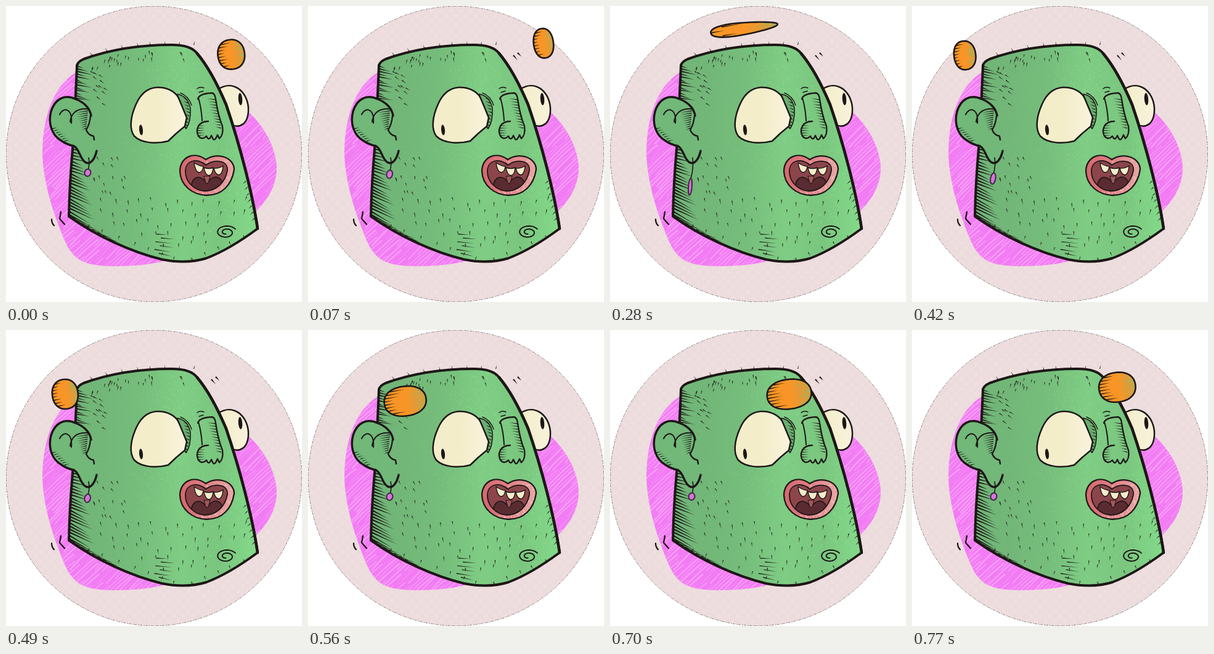
An HTML page with a canvas that plays this animation: 480x480 px, repeating every 0.84 s.

```html
<!DOCTYPE html>
<html lang="en">
<head>
<meta charset="utf-8">
<title>Orbiting ball</title>
<style>
html, body { margin: 0; width: 100%; height: 100%; overflow: hidden; background: #fff; }
canvas { display: block; width: 480px; height: 480px; }
</style>
</head>
<body>
<canvas id="stage" width="480" height="480"></canvas>
<script>
const SIZE = 480, STEP = 70, STEPS = 12, INK = '#1d1716', CREAM = '#f4edca';
const view = document.getElementById('stage').getContext('2d');
const still = document.createElement('canvas');
still.width = still.height = SIZE;
const g = still.getContext('2d');

function seeded(seed) {
  return () => {
    seed = (seed + 0x6d2b79f5) | 0;
    let t = Math.imul(seed ^ (seed >>> 15), 1 | seed);
    t = (t + Math.imul(t ^ (t >>> 7), 61 | t)) ^ t;
    return ((t ^ (t >>> 14)) >>> 0) / 4294967296;
  };
}

function ink(c, path, width = 2.5, color = INK) {
  c.strokeStyle = color;
  c.lineWidth = width;
  c.lineCap = c.lineJoin = 'round';
  c.stroke(path);
}

const line = (d, width, color) => ink(g, new Path2D(d), width, color);

// Fill, optional detail kept inside, then outline
function shape(d, fill, width, inside) {
  const path = new Path2D(d);
  g.fillStyle = fill;
  g.fill(path);
  if (inside) {
    g.save();
    g.clip(path);
    inside();
    g.restore();
  }
  if (width) ink(g, path, width);
}

function oval(c, x, y, rx, ry, turn, fill) {
  const path = new Path2D();
  path.ellipse(x, y, rx, ry, turn, 0, 2 * Math.PI);
  c.fillStyle = fill;
  c.fill(path);
  return path;
}

// Stroke that narrows to a point
function hair(c, x, y, dx, dy, w = 1.4) {
  const l = Math.hypot(dx, dy), nx = -dy / l * w / 2, ny = dx / l * w / 2;
  c.fillStyle = INK;
  c.beginPath();
  c.moveTo(x + nx, y + ny);
  c.lineTo(x + dx, y + dy);
  c.lineTo(x - nx, y - ny);
  c.fill();
}

function hatch(n, at) {
  for (let i = 0; i < n; i++) hair(g, ...at(i, i / (n - 1)));
}

function speckle(n, x, y, sx, sy, color, seed) {
  const r = seeded(seed), spread = () => r() + r() + r() - 1.5;
  g.fillStyle = color;
  for (let i = 0; i < n; i++) {
    const s = 0.7 + r() * 1.6;
    g.fillRect(x + spread() * sx, y + spread() * sy, s, s);
  }
}

function ramp(x0, x1, ...colors) {
  const grad = g.createLinearGradient(x0, 0, x1, 0);
  colors.forEach((color, i) => grad.addColorStop(i / (colors.length - 1), color));
  return grad;
}

function backdrop() {
  g.fillStyle = '#fff';
  g.fillRect(0, 0, SIZE, SIZE);
  const disc = oval(g, 240, 240, 239.7, 239.7, 0, '#ecdcdd');
  g.save();
  g.clip(disc);
  for (let row = 0; row < 62; row++)
    for (let x = row % 2 * 8; x < SIZE; x += 16) oval(g, x, row * 8, 3.2, 3.2, 0, '#efdfde');
  g.restore();
  g.setLineDash([3, 2, 1, 3]);
  ink(g, disc, 0.7, '#5b5052');
  g.setLineDash([]);
}

// Long broken streaks rising to the right
function streaks() {
  const r = seeded(14);
  for (let c = 130; c < 800; c += 6.5)
    for (let x = 40 + r() * 40; x < 440;) {
      const end = x + 25 + r() * 60, mid = (x + end) / 2, y = u => c - 0.95 * u;
      line(`M${x} ${y(x)}Q${mid} ${y(mid) - 5} ${end} ${y(end)}`, 0.6 + r() * 1.8, '#f8a0f7');
      x = end + 6 + r() * 20;
    }
}

function blob() {
  shape('M120 104C82 122 59 172 59 240C61 286 74 330 95 380C110 414 128 421 174 422' +
    'Q230 422 265 411L404 334C428 312 439 286 439 262C437 222 410 178 370 155Z', '#f27cf4', 0, streaks);
}

function skull() {
  const side = 'C326 96 343 127 357 160C378 222 399 300 408 361';
  shape(`M115 96Q117 90 126 86Q190 63 268 63Q300 63 310 77${side}` +
    'Q362 395 325 409Q293 419 253 411C204 399 148 374 102 341Q103 288 108 232Q113 150 115 96Z',
  ramp(100, 408, '#70b477', '#72b778', '#76be7c', '#7fcd84', '#7ac67f', '#84da8a'), 4, () => {
    speckle(900, 275, 160, 50, 110, '#8bd690a0', 3);
    speckle(500, 370, 290, 40, 110, '#87dd8da0', 4);
    speckle(400, 240, 290, 45, 90, '#82cb86a0', 5);
    speckle(300, 170, 220, 70, 130, '#7dc582a0', 6);
  });
  line('M310 77' + side, 4.6);
}

function edgeHatch() {
  hatch(13, (i, t) => [114 - 3 * t, 97 + 52 * t, 12 + i * 7 % 5 * 4, 4 + i % 3, 2.2]);
  hatch(22, (i, t) => [108 - 6 * t, 232 + 106 * t, 11 + 24 * t + i * 5 % 4 * 3, 3 + 18 * t, 2.5]);
  hatch(8, (i, t) => [104 + 62 * t, 342 + 35 * t, 16, 5 + i % 3, 1.8]);
}

function stubble() {
  const r = seeded(29);
  const top = x => 63 + Math.max(0, 255 - x) ** 2 / 760;
  const jaw = x => x < 290 ? 341 + (x - 102) * 0.38 : 412 - (x - 290) * 0.43;
  hatch(26, () => {
    const x = 135 + r() * 165;
    return [x, top(x) + 7 + r() * 18, (x - 220) / 30, 5 + r() * 3];
  });
  hatch(12, () => [136 + r() * 24, 100 + r() * 65, 7, 3 + r() * 3]);
  hatch(16, () => [142 + r() * 50, 235 + r() * 75, 1 + r() * 3, 6]);
  for (let y = 308; y < 405; y += 18)
    for (let x = 145 + r() * 10; x < 392; x += 16 + r() * 10) {
      const v = y + r() * 12, free = !(x > 330 && v > 348);
      if (free && v < jaw(x) - 12) hair(g, x, v, (270 - x) / 50, 6 + r() * 3);
    }
  // Stray hairs outside the outline
  for (let x = 140; x < 312; x += 16 + r() * 12) hair(g, x, top(x), (x - 235) / 26 - 1, -6);
  for (let x = 135; x < 402; x += 18 + r() * 10) hair(g, x, jaw(x) + 1, x < 290 ? -2 : 3, 6);
  hatch(7, (i, t) => [389 + 14 * t, 284 + 60 * t, -5, 5]);
}

function ear() {
  const rim = 'M138 178C136 164 124 155 113 151C95 142 79 151 73 171C68 190 74 209 89 218' +
    'Q99 225 110 227C120 233 119 246 128 253C137 259 144 248 147 235';
  shape(rim + 'Q145 217 134 207Z', '#71b879');
  line(rim, 3.4);
  line('M87 176C93 163 108 166 106 190', 2);
  line('M104 188Q107 165 133 167', 2);
  line('M137 178Q136 191 130 201Q134 210 142 211L143 217', 2.4);
  hatch(9, (i, t) => [133 - 3 * t, 170 + 28 * t, -20 + 13 * t, 3]);
  hatch(7, (i, t) => [75 + 20 * t, 199 + 20 * t, 8, -2]);
}

function farEye() {
  shape('M344 135C368 119 391 138 393 165C394 193 378 199 364 192Z', ramp(345, 394, CREAM, '#f8f2dc'), 2.5);
  oval(g, 380, 151, 3.2, 10, -0.08, INK);
}

function nearEye() {
  shape('M278 143Q295 146 299 166Q300 188 292 199L286 190Z', '#69b06f', 1.6);
  line('M283 141Q296 146 301 161', 1.4);
  hatch(9, (i, t) => [298 - Math.abs(t - 0.5) * 8, 152 + 42 * t, -7, -3]);
  shape('M244 132C262 131 277 140 281 152Q287 166 293 181L290 195Q276 206 263 219' +
    'C245 224 220 223 208 211C200 200 201 181 211 159Q222 134 244 132Z', ramp(202, 292, CREAM, CREAM, '#f9f3dd'), 2.5);
  oval(g, 219, 201, 3, 8.5, -0.1, INK);
}

function nose() {
  line('M311 151Q313 142 334 141Q339 142 340 151Q344 178 351 195Q353 209 346 215L343 209' +
    'Q339 219 336 216L333 210Q329 220 325 211Q318 218 312 211C307 201 311 187 328 187', 2.3);
  line('M312 149Q317 166 318 186', 2);
  hatch(11, (i, t) => [340 + 9 * t, 152 + 46 * t, -14 + 5 * t, -2]);
  hatch(5, (i, t) => [311, 194 + 16 * t, 12, 0]);
  line('M310 134Q315 130 321 133M313 140L320 138', 1.4);
}

function tooth(x, y, tilt) {
  shape(`M${x - 8} ${y - tilt}Q${x} ${y + 3} ${x + 7} ${y + tilt}Q${x + 6} ${y + 12} ${x} ${y + 13}` +
    `Q${x - 6} ${y + 12} ${x - 8} ${y - tilt}Z`, CREAM, 1.4);
}

function mouth() {
  shape('M282 268C282 246 304 234 324 249C343 236 370 246 370 265C366 291 350 307 325 307C302 306 283 291 282 268Z',
    ramp(283, 369, '#d5686d', '#df8186', '#e7a6a5'), 2.3, () => {
      speckle(170, 350, 280, 28, 40, '#f0bfba', 9);
      speckle(70, 325, 303, 40, 6, '#efb4b2', 10);
    });
  shape('M291 269C290 249 312 246 324 258C340 247 361 251 359 267C355 287 341 300 322 300C304 299 291 284 291 269Z',
    '#8c454b', 1.8, () => {
      shape('M300 304C298 276 314 270 326 288C338 268 357 278 350 304Z', '#5a2c32', 1.5);
      shape('M321 276Q326 300 331 276Z', '#a5565b', 1.2);
      tooth(313, 257, 3);
      tooth(329, 262, 0);
      tooth(345, 261, -2);
    });
}

function details() {
  let swirl = '';
  for (let a = 0; a < 10.5; a += 0.2) {
    const s = 1 - a / 14;
    swirl += `${swirl ? 'L' : 'M'}${357 + Math.cos(a + 0.5) * 17 * s} ${367 - Math.sin(a + 0.5) * 11 * s}`;
  }
  line(swirl, 2);
  hatch(6, (i, t) => [244 + i % 2 * 8 - 4 * t, 370 + 31 * t, 18 + i * 5 % 11, 1 + 4 * t]);
  line('M74 346Q74 352 78 356M89 334L87 345L95 354', 2.3);
}

[backdrop, blob, farEye, skull, edgeHatch, stubble, ear, nearEye, nose, mouth, details].forEach(f => f());

// Tilted orbit: fast behind the head, slower in front; depth runs from -1 (back) to 1 (front)
function orbit(t) {
  const a = 0.3 - t + 0.28 * Math.cos(t - 1.1) + 0.05 * Math.cos(2 * t);
  const depth = Math.sin(a), back = Math.max(0, -depth) ** 2, side = 150 * Math.cos(a);
  return {
    x: 232 + side,
    y: 74 + 39 * depth - 0.1 * side,
    rx: 16 + (31 - 8 * depth) * depth ** 2,
    ry: 24 - 14.5 * back,
    taper: 0.35 * back
  };
}

function drawBall({ x, y, rx, ry, taper }, seed) {
  const path = new Path2D(), r = seeded(seed);
  const soft = v => Math.sign(v) * Math.abs(v) ** 0.9;
  for (let a = 0; a < 2 * Math.PI; a += 0.12) {
    const u = soft(Math.cos(a));
    path.lineTo(u * rx, soft(Math.sin(a)) * ry * (1 - taper * u));
  }
  path.closePath();
  view.save();
  view.translate(x, y);
  view.rotate(-0.13);
  const grad = view.createLinearGradient(-rx, 0, rx, 0);
  grad.addColorStop(0.5, '#f99526');
  grad.addColorStop(1, '#cfa044');
  view.fillStyle = grad;
  view.fill(path);
  view.save();
  view.clip(path);
  view.fillStyle = '#8fb968';
  for (let i = 0; i < 40; i++) {
    const s = 0.8 + r() * 1.6;
    view.fillRect((1 - r() * r() * 0.8) * rx * 0.95, (r() * 1.6 - 0.7) * ry, s, s);
  }
  const rows = Math.round(ry / 3);
  for (let i = 0; i < rows; i++) {
    const v = -0.75 + 1.5 * i / (rows - 1);
    hair(view, -rx * Math.sqrt(1 - v * v), v * ry, rx * (0.4 + r() * 0.35), -1, 1.8);
  }
  view.restore();
  ink(view, path, 2.6);
  view.restore();
}

// The ring is pulled down while the ball passes behind
function drawEarring(t) {
  const pull = ((1 + Math.cos(t - 2.1)) / 2) ** 3;
  const x = 132.5 - 2.5 * pull, y = 270 + 23 * pull, ry = 5.8 + 7.7 * pull;
  ink(view, new Path2D(`M134 246Q136 ${(246 + y - ry) / 2} ${x + 1} ${y - ry}`), 1.6);
  ink(view, oval(view, x, y, 5 - 2.2 * pull, ry, 0.25 - 0.17 * pull, '#d973dc'), 2, '#3d2940');
}

function draw(step) {
  const t = 2 * Math.PI * step / STEPS, ball = orbit(t);
  view.drawImage(still, 0, 0);
  if (Math.hypot(ball.x - 340, ball.y - 82) > 35) {
    hair(view, 333, 80, 7, 8, 2.6);
    hair(view, 340, 76, 6, 6, 2.6);
  }
  drawEarring(t);
  drawBall(ball, 50 + step);
}

const start = performance.now();
let shown = -1;
function tick() {
  const step = Math.floor((performance.now() - start) / STEP) % STEPS;
  if (step !== shown) draw(shown = step);
  requestAnimationFrame(tick);
}
tick();
</script>
</body>
</html>
```
